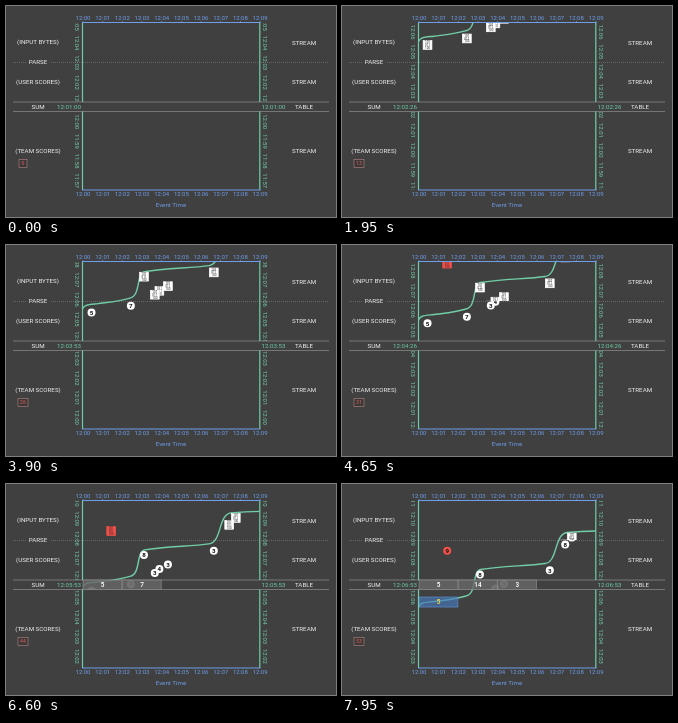
An HTML page with a canvas that plays this animation: 330 by 211 pixels, repeating every 8 s.

```html
<!DOCTYPE html>
<html lang="en">
<head>
<meta charset="utf-8">
<title>Streams and tables</title>
<style>
html, body { margin: 0; width: 100%; height: 100%; overflow: hidden; background: #404040; }
canvas { display: block; width: 330px; height: 211px; }
</style>
</head>
<body>
<canvas id="stage"></canvas>
<script>
const canvas = document.getElementById('stage');
const ratio = window.devicePixelRatio || 1;
canvas.width = 330 * ratio;
canvas.height = 211 * ratio;
const ctx = canvas.getContext('2d');

const LEFT = 77, RIGHT = 254, TOP = 17, PARSE = 56, SUM = 96, OUT = 105.5, BOTTOM = 184;
const MINUTE = 19.67;                 // pixels per minute on both axes
const BLUE = '#6f9de8', TEAL = '#70cda6', WHITE = '#f2f2f2';

// value, event time and arrival time in seconds
const scores = [
  [5, 26, 319], [7, 146, 339], [3, 219, 373], [4, 233, 385], [3, 259, 399],
  [8, 186, 428], [3, 399, 441], [9, 86, 501], [8, 446, 520], [1, 466, 541]
];
// completeness curve, placed for the moment CURVE_TIME
const CURVE_TIME = 413;
const curve = new Path2D('M76 124C78 118 83 118.500 92 117.500C104 116 113 115.500 124 112' +
  'C135 110 130 87 138.500 85.500C160 82 185 82 203 79.500C216 78 212 50 225 48.500Q239 47 255 47');

const pad = v => String(v).padStart(2, '0');
const clock = m => pad(((Math.floor(m / 60) + 11) % 12) + 1) + ':' + pad(((m % 60) + 60) % 60);
const eventX = s => LEFT + s / 60 * MINUTE;

function text(str, x, y, color = WHITE, size = 6.2, weight = 400) {
  ctx.font = `${weight} ${size}px Roboto, sans-serif`;
  ctx.fillStyle = color;
  ctx.fillText(str, x, y);
}

function line(x1, y1, x2, y2, color, width = 1) {
  ctx.strokeStyle = color;
  ctx.lineWidth = width;
  ctx.beginPath();
  ctx.moveTo(x1, y1);
  ctx.lineTo(x2, y2);
  ctx.stroke();
}

function clipped(x, y, w, h, draw) {
  ctx.save();
  ctx.beginPath();
  ctx.rect(x, y, w, h);
  ctx.clip();
  draw();
  ctx.restore();
}

function box(x, y, w, h, fill, stroke) {
  ctx.fillStyle = fill;
  ctx.fillRect(x, y, w, h);
  ctx.strokeStyle = stroke;
  ctx.lineWidth = 0.7;
  ctx.strokeRect(x, y, w, h);
}

function bytes(x, y, color) {
  box(x - 4.4, y - 4.4, 8.8, 8.8, color, color);
  ['101', '011', '100'].forEach((row, i) => text(row, x, y - 2.6 + i * 2.8, '#222', 3));
}

function ball(x, y, value, color) {
  ctx.fillStyle = color;
  ctx.beginPath();
  ctx.arc(x, y, 4, 0, 7);
  ctx.fill();
  text(value, x, y + 0.4, '#111', 6.2, 600);
}

function backdrop() {
  ctx.fillStyle = '#404040';
  ctx.fillRect(0, 0, 330, 211);
  ctx.setLineDash([1, 1]);
  line(7, PARSE + 0.5, 20, PARSE + 0.5, '#777', 0.7);
  line(45, PARSE + 0.5, 323, PARSE + 0.5, '#777', 0.7);
  ctx.setLineDash([]);
  for (const y of [SUM, OUT]) line(7, y, 323, y, '#858585', 0.8);
  for (const [str, y] of [['(INPUT BYTES)', 36], ['PARSE', 56], ['(USER SCORES)', 76],
    ['SUM', 101], ['(TEAM SCORES)', 145]]) text(str, 32, y);
  for (const [str, y] of [['STREAM', 37], ['STREAM', 76], ['TABLE', 101], ['STREAM', 145]])
    text(str, 298, y);
  for (let m = 0; m < 10; m++) {
    const x = LEFT + m * MINUTE;
    for (const y of [12.3, 188.5]) text(clock(720 + m), x, y, BLUE, 6);
    line(x, TOP - 2, x, TOP, BLUE, 0.7);
  }
  text('Event Time', 165, 199, BLUE);
}

function timeAxis(now) {
  const first = Math.floor(now / 60) - 6;
  for (const [y, end] of [[TOP, SUM], [OUT, BOTTOM]])
    clipped(0, y, 330, end - y, () => {
      for (let m = first; m < first + 13; m++)
        for (const x of [70.5, 258.5]) {
          ctx.save();
          ctx.translate(x, SUM - (m - now / 60) * MINUTE);
          ctx.rotate(Math.PI / 2);
          text(clock(720 + m), 0, 0, TEAL, 6);
          ctx.restore();
        }
    });
  const s = Math.floor(now);
  const label = clock(720 + Math.floor(s / 60)) + ':' + pad(s % 60);
  text(label, 63, 101, TEAL);
  text(label, 267.5, 101, TEAL);
}

function table(now) {
  const sums = [];
  for (const [value, event, arrival] of scores)
    if (arrival <= now) {
      const w = Math.floor(event / 120);
      sums[w] = (sums[w] || 0) + value;
    }
  sums.forEach((sum, w) => {
    const x = eventX(w * 120);
    box(x, SUM, MINUTE * 2 - 0.5, OUT - SUM, 'rgba(104,104,104,.8)', '#888');
    text(sum, x + MINUTE, 101.2, WHITE, 6.4, 600);
  });
}

// the first window's pane leaves the table once the curve has passed its end
function result(shift) {
  const y = 113 + shift;
  if (y < SUM) return;
  box(LEFT, y, MINUTE * 2 - 0.5, 10, 'rgba(72,122,190,.65)', '#5c8fd0');
  text(5, LEFT + MINUTE, y + 5.4, '#f0cf45', 6.4, 600);
}

function events(now) {
  for (const [value, event, arrival] of [...scores].reverse()) {
    const x = eventX(event), y = SUM - 0.5 - (arrival - now) / 60 * MINUTE;
    const color = value === 9 ? '#f2504b' : '#fff';
    if (y < TOP - 6 || y > OUT + 6) continue;
    clipped(LEFT, TOP, RIGHT - LEFT, PARSE - TOP, () => bytes(x, y, color));
    clipped(LEFT, PARSE, RIGHT - LEFT, SUM - PARSE, () => ball(x, y, value, color));
    ctx.globalAlpha = 0.5;
    clipped(LEFT, SUM, RIGHT - LEFT, OUT - SUM, () => ball(x, y, value, color));
    ctx.globalAlpha = 1;
  }
}

function counter(step) {
  const w = step < 10 ? 8 : 10;
  box(17 - w / 2, 153.5, w, 8, '#3b3838', '#a57878');
  text(step, 17, 157.9, '#e0605c', 5.2);
}

function render(time) {
  const step = Math.floor(time % 8000 / 150);
  const now = 60.1 + 6.66 * step;
  const shift = (now - CURVE_TIME) / 60 * MINUTE;
  ctx.setTransform(ratio, 0, 0, ratio, 0, 0);
  ctx.textAlign = 'center';
  ctx.textBaseline = 'middle';
  backdrop();
  timeAxis(now);
  clipped(LEFT, TOP, RIGHT - LEFT, BOTTOM - TOP, () => {
    ctx.translate(0, shift);
    ctx.strokeStyle = TEAL;
    ctx.lineWidth = 1.4;
    ctx.stroke(curve);
  });
  events(now);
  table(now);
  result(shift);
  for (const x of [LEFT - 0.5, RIGHT - 0.2])
    for (const [y, end] of [[TOP, SUM], [OUT, BOTTOM]]) line(x, y, x, end, TEAL, 1.2);
  for (const y of [TOP - 0.5, BOTTOM]) line(LEFT - 1, y, RIGHT + 0.5, y, BLUE, 1.2);
  counter(step);
}

let start;
function tick(time) {
  start ??= time;
  render(time - start);
  requestAnimationFrame(tick);
}
render(0);
requestAnimationFrame(tick);
</script>
</body>
</html>
```
